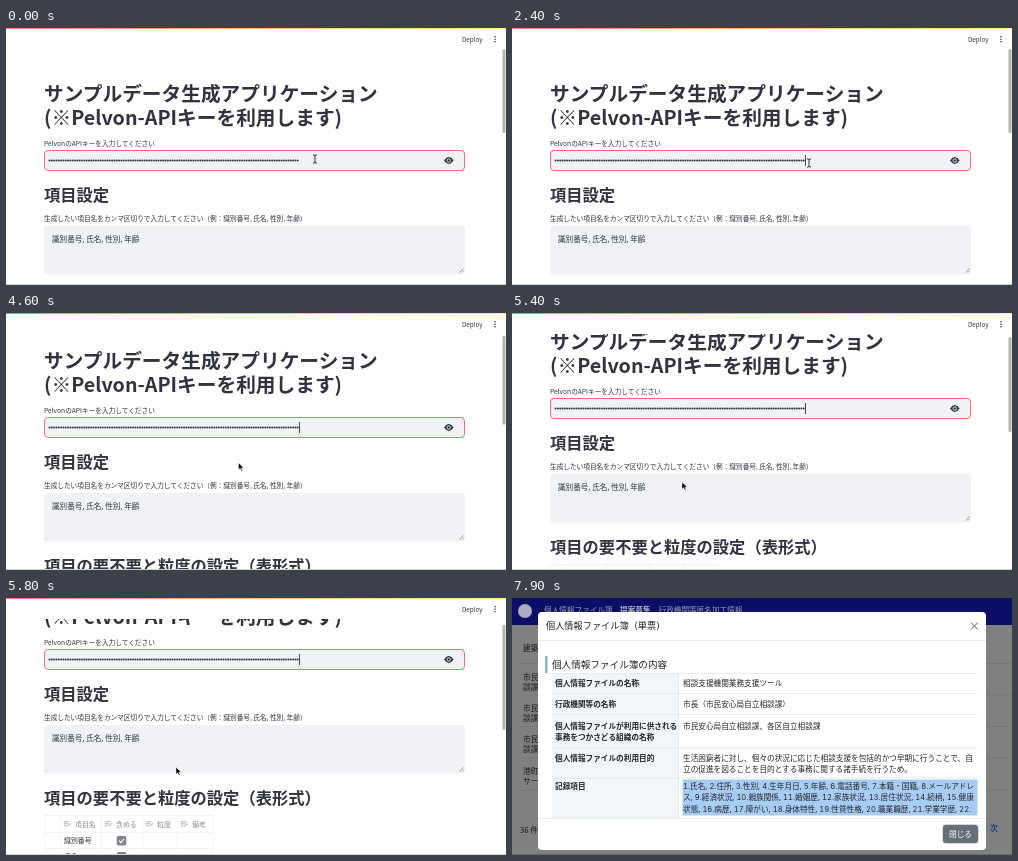
These frames come from a looping animation (500 px wide and 257 px high, 8 s). An HTML page:

```html
<!DOCTYPE html>
<html lang="ja">
<head>
<meta charset="utf-8">
<title>サンプルデータ生成</title>
<style>
html, body { margin: 0; width: 100%; height: 100%; overflow: hidden; background: #fff; }
svg { display: block; width: 100vw; height: 100vh; }
text { font-family: "Noto Sans CJK JP", "Noto Sans CJK", sans-serif; fill: #31333f; white-space: pre; }
.h1 { font-size: 19.7px; font-weight: 700; }
.h2 { font-size: 16.3px; font-weight: 700; }
.label { font-size: 6.67px; }
.value { font-size: 7.6px; }
.head { font-size: 6.9px; fill: #8a8c96; }
.cell { font-size: 6.9px; font-weight: 500; }
.grid { stroke: #eeeff3; stroke-width: .7; fill: none; }
.icon { stroke: #8f919a; stroke-width: .7; fill: none; }
#records text { font-size: 7.65px; fill: #212529; }
#records .key { font-weight: 700; }
#records .list { font-family: Inter, "Noto Sans CJK JP", sans-serif; font-variant-numeric: tabular-nums; }
#records .dim { fill: #15171a; }
#records .rule { stroke: #dee2e6; stroke-width: .7; fill: none; }
</style>
</head>
<body>
<svg viewBox="0 0 500 257" preserveAspectRatio="none">
  <defs>
    <linearGradient id="deco"><stop stop-color="#ff8078"/><stop offset="1" stop-color="#fff08a"/></linearGradient>
    <g id="edit" class="icon"><path d="M-3.8-2.2H2M-3.8-.2H1M-3.8 1.8H-1.2M-.4 2.6L3.8-.8"/></g>
    <g id="check">
      <rect x="-4.8" y="-4.8" width="9.6" height="9.6" rx="2" fill="#83848b"/>
      <path d="M-2.5 0L-.7 1.9 2.6-1.8" fill="none" stroke="#fff" stroke-width="1.2"/>
    </g>
  </defs>

  <g id="app">
    <g id="page">
      <text class="h1" x="38" y="73.4">サンプルデータ生成アプリケーション</text>
      <text class="h1" x="38" y="97.4">(※Pelvon-APIキーを利用します)</text>
      <text class="label" x="38" y="117.5">PelvonのAPIキーを入力してください</text>
      <rect x="38.5" y="122.5" width="420" height="20" rx="3.5" fill="#f0f2f6" stroke="#ff7070"/>
      <path d="M43.5 132.5H293" stroke="#31333f" stroke-width="2" stroke-linecap="round" stroke-dasharray="0 2.32"/>
      <path id="caret" d="M293.5 127V138" stroke="#31333f" stroke-width=".9"/>
      <path d="M438 132.5Q442.8 125.7 447.6 132.5 442.8 139.3 438 132.5Z" fill="#31333f"/>
      <circle cx="442.8" cy="132.5" r="1.7" fill="#31333f" stroke="#f0f2f6" stroke-width=".9"/>

      <text class="h2" x="38" y="173">項目設定</text>
      <text class="label" x="38" y="192.5">生成したい項目名をカンマ区切りで入力してください（例：識別番号, 氏名, 性別, 年齢）</text>
      <rect x="38" y="198" width="421" height="48.5" rx="3.5" fill="#f0f2f6"/>
      <text class="value" x="46" y="214">識別番号, 氏名, 性別, 年齢</text>
      <path d="M453.5 244.5L457.5 240.5M456 244.5L457.5 243" stroke="#777" stroke-width=".7"/>

      <text class="h2" x="38" y="276.6">項目の要不要と粒度の設定（表形式）</text>
      <path class="grid" d="M38.5 370V288.5H206.5V370M54.5 288.5V370M95.5 288.5V370M136.5 288.5V370M171.5 288.5V370M38.5 305.5H206.5M38.5 321.5H206.5M38.5 337.5H206.5"/>
      <use href="#edit" x="61.5" y="297"/><use href="#edit" x="102.5" y="297"/>
      <use href="#edit" x="143.5" y="297"/><use href="#edit" x="178.5" y="297"/>
      <text class="head" x="69" y="299.6">項目名</text>
      <text class="head" x="110" y="299.6">含める</text>
      <text class="head" x="151" y="299.6">粒度</text>
      <text class="head" x="186" y="299.6">備考</text>
      <text class="cell" x="58" y="316.2">識別番号</text>
      <text class="cell" x="58" y="332.2">氏名</text>
      <use href="#check" x="115.5" y="313.7"/><use href="#check" x="115.5" y="329.7"/>
    </g>

    <rect width="500" height="21" fill="#fff"/>
    <rect width="500" height="1" fill="url(#deco)"/>
    <text x="456" y="13.5" font-size="6.3">Deploy</text>
    <g fill="#31333f"><circle cx="489" cy="8.8" r=".8"/><circle cx="489" cy="11.3" r=".8"/><circle cx="489" cy="13.8" r=".8"/></g>
    <rect id="thumb" x="496.5" y="21" width="3" height="84" rx="1.5" fill="#b4b4b4"/>
    <rect y="256" width="500" height="1" fill="#d2d2d2"/>

    <g id="beam" fill="none" stroke="#222" stroke-width=".9">
      <path d="M-2-4.2Q0-4.2 0-3 0-4.2 2-4.2M0-3.2V3.2M-2 4.2Q0 4.2 0 3 0 4.2 2 4.2"/>
    </g>
    <path id="arrow" d="M0 0V7.2L1.7 5.7 2.9 8.3 4 7.8 2.9 5.3H5.1Z" fill="#000" stroke="#fff" stroke-width=".5"/>
  </g>

  <g id="records">
    <rect width="500" height="257" fill="#7f8080"/>
    <rect width="500" height="27" fill="#0b0d66"/>
    <circle cx="13" cy="13" r="7" fill="#a9abc0"/>
    <text x="32" y="15.2" style="fill:#9a9cb0">個人情報ファイル簿</text>
    <text x="108" y="15.2" style="fill:#b4b5c4;font-weight:700">提案募集</text>
    <text x="146.5" y="15.2" style="fill:#9a9cb0">行政機関等匿名加工情報</text>
    <path d="M8 65.5H500M8 97H500M8 128.5H500M8 160H500M8 192H500" stroke="#707173" stroke-width=".7"/>
    <g id="side"></g>
    <text class="dim" x="8" y="235">36 件</text>
    <text x="478" y="233" style="fill:#0b1a70">次</text>

    <rect x="26" y="14" width="448" height="238" rx="4" fill="#fff"/>
    <text x="34" y="31.4" style="font-size:9.2px">個人情報ファイル簿（単票）</text>
    <path d="M459 24.7L465.8 31.5M465.8 24.7L459 31.5" stroke="#555" stroke-width="1"/>
    <path class="rule" d="M26 42.5H474M26 220.5H474"/>
    <rect x="33" y="58" width="2.5" height="17" fill="#8fb0d3"/>
    <text x="40" y="70" style="font-size:9.6px;font-weight:500">個人情報ファイル簿の内容</text>
    <rect x="40" y="76" width="126" height="144" fill="#f1f6fb"/>
    <path class="rule" d="M40 75.5H465M40 95.5H465M40 116.5H465M40 150H465M40 180H465M166.5 75.5V220"/>
    <rect x="170.5" y="181.5" width="295" height="36" fill="#a8cdf5"/>
    <g id="sheet"></g>
    <rect x="431" y="227" width="35" height="18" rx="3" fill="#666e76" stroke="#c9cdd1" stroke-width="1.4" paint-order="stroke"/>
    <text x="437" y="238.9" style="fill:#fff">閉じる</text>
    <rect y="256" width="500" height="1" fill="#6a6a6a"/>
  </g>
</svg>
<script>
const $ = id => document.getElementById(id);
const LOOP = 8000, STEP = 100, CUT = 7800;

// [time, scroll]
const scrollKeys = [[4200, 0], [4300, 7], [4500, 16], [4800, 21.5], [5100, 23], [5200, 23],
  [5300, 27], [5400, 37], [5600, 57], [5800, 71], [6100, 75]];
// [time, x, y]
const mouseKeys = [[100, 309, 131], [500, 297, 131], [600, 297, 131], [1500, 266, 124],
  [2100, 297, 135], [3300, 297, 135], [3400, 295, 135], [3800, 295, 135], [4000, 270, 138],
  [4300, 270, 138], [5100, 170, 169], [6100, 170, 169], [6700, 270, 128], [6800, 270, 128],
  [7000, 505, 34]];

function addText(parent, x, y, string, cls) {
  const el = document.createElementNS(parent.namespaceURI, 'text');
  el.setAttribute('x', x);
  el.setAttribute('y', y);
  el.setAttribute('class', cls);
  el.textContent = string;
  parent.append(el);
}

const sheet = [
  [88, ['個人情報ファイルの名称'], ['相談支援機関業務支援ツール']],
  [109, ['行政機関等の名称'], ['市長（市民安心局自立相談課）']],
  [131, ['個人情報ファイルが利用に供される', '事務をつかさどる組織の名称'], ['市民安心局自立相談課、各区自立相談課']],
  [163, ['個人情報ファイルの利用目的'], [
    '生活困窮者に対し、個々の状況に応じた相談支援を包括的かつ早期に行うことで、自',
    '立の促進を図ることを目的とする事務に関する諸手続を行うため。']],
  [191, ['記録項目'], [
    '1.氏名, 2.住所, 3.性別, 4.生年月日, 5.年齢, 6.電話番号, 7.本籍・国籍, 8.メールアドレ',
    'ス, 9.経済状況, 10.親族関係, 11.婚姻歴, 12.家族状況, 13.居住状況, 14.続柄, 15.健康',
    '状態, 16.病歴, 17.障がい, 18.身体特性, 19.性質性格, 20.職業職歴, 21.学業学歴, 22.']]
];
for (const [y, keys, values] of sheet) {
  keys.forEach((s, i) => addText($('sheet'), 43, y + i * 11.3, s, 'key'));
  values.forEach((s, i) => addText($('sheet'), 171, y + i * 11.3, s, 'list'));
}
const side = [[53, '建築'], [81.5, '市民'], [91.5, '談課'], [113, '市民'], [123, '談課'],
  [144, '市民'], [154, '談課'], [175.5, '港町'], [185.5, 'サー']];
for (const [y, s] of side) addText($('side'), 11, y, s, 'dim');

function track(keys, t) {
  const n = keys.findIndex(k => k[0] > t);
  if (n === 0) return keys[0].slice(1);
  if (n < 0) return keys[keys.length - 1].slice(1);
  const a = keys[n - 1], b = keys[n], p = (t - a[0]) / (b[0] - a[0]);
  return a.slice(1).map((v, i) => v + (b[i + 1] - v) * p);
}
const show = (id, on) => { $(id).style.display = on ? '' : 'none'; };
const move = (id, x, y) => $(id).setAttribute('transform', `translate(${x} ${y})`);

function draw(now) {
  const t = Math.floor(now % LOOP / STEP) * STEP;
  const scroll = Math.round(track(scrollKeys, t)[0]);
  const [x, y] = track(mouseKeys, t);
  const arrow = t > 4300 && t < 6200 || t > 6800;
  show('app', t < CUT);
  show('records', t >= CUT);
  move('page', 0, -scroll);
  $('thumb').setAttribute('y', 21 + scroll * .08);
  $('thumb').setAttribute('height', 84 + scroll * .3);
  show('caret', (t + 600) % 1000 < 500);
  move('beam', x, y);
  move('arrow', x, y);
  show('beam', !arrow);
  show('arrow', arrow && t < 7000);
}
const start = performance.now();
function tick() {
  draw(performance.now() - start);
  requestAnimationFrame(tick);
}
tick();
</script>
</body>
</html>
```
